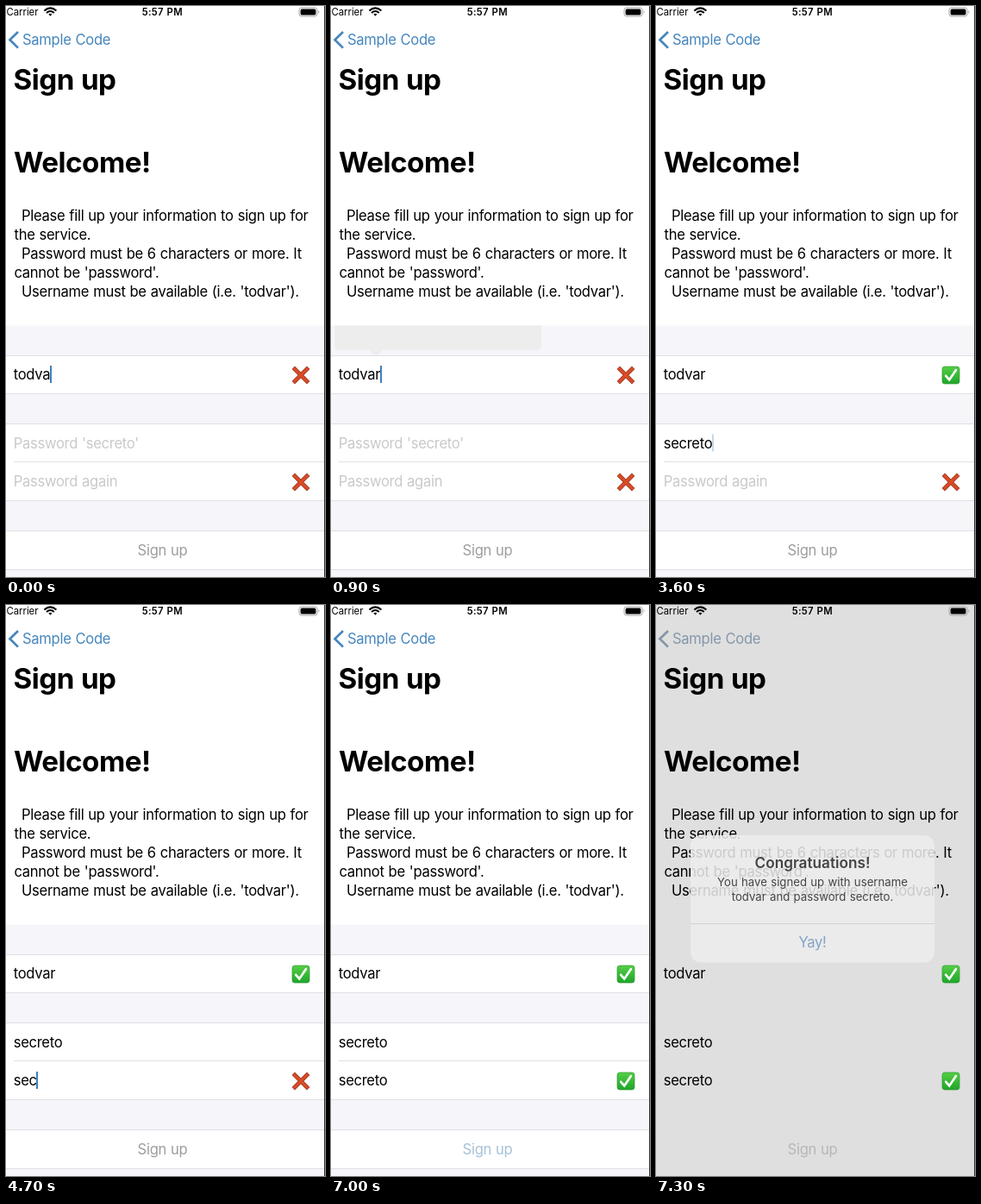
An HTML page for the animation above (7400 ms loop, 370 px wide and 662 px high).

```html
<!DOCTYPE html>
<html lang="en">
<head>
<meta charset="utf-8">
<title>Sign up form</title>
<style>
  html, body { margin: 0; width: 100%; height: 100%; overflow: hidden; background: #fff; }
  svg { display: block; width: 370px; height: 662px; }
  text {
    font: 16.6px Inter, Roboto, sans-serif;
    font-optical-sizing: none;
    letter-spacing: -.3px;
    word-spacing: .6px;
    white-space: pre;
  }
  .big { font-size: 33.2px; font-weight: 700; letter-spacing: -.5px; }
  .status { font-size: 11.3px; letter-spacing: 0; }
  .bold { font-weight: 600; letter-spacing: .3px; }
  .mid { text-anchor: middle; }
  .title { font-size: 17.2px; font-weight: 600; letter-spacing: 0; }
  .note { font-size: 13.2px; letter-spacing: 0; }
</style>
</head>
<body>
<svg viewBox="0 0 370 662">
  <defs>
    <linearGradient id="green" x2="0" y2="1">
      <stop stop-color="#55cf45"/><stop offset="1" stop-color="#1fa52b"/>
    </linearGradient>
    <g id="cross" fill="none">
      <path d="M-8.7 -8.7L8.7 8.7M8.7 -8.7L-8.7 8.7" stroke="#9e3a20" stroke-width="4.8"/>
      <path d="M-8.3 -8.3L8.3 8.3M8.3 -8.3L-8.3 8.3" stroke="#da4a27" stroke-width="3.3"/>
    </g>
    <g id="check">
      <rect x="-10" y="-10" width="20" height="20" rx="3" fill="url(#green)" stroke="#2b9a32" stroke-width=".7"/>
      <path d="M-5.8 .8L-1.8 5.4L5.8 -5.8" fill="none" stroke="#fff" stroke-width="2.7" stroke-linecap="round"/>
    </g>
  </defs>

  <rect id="page" width="370" height="662"/>
  <g id="bands">
    <rect y="370.5" width="370" height="35"/>
    <rect y="449" width="370" height="36"/>
    <rect y="573" width="370" height="36"/>
    <rect y="653" width="370" height="9"/>
  </g>
  <path id="rules" d="M0 405.5H370M0 449.5H370M0 484.5H370M9 528.5H370M0 573.5H370M0 608.5H370M0 653.5H370" stroke="#e0dfe4"/>

  <text class="status" x=".5" y="11">Carrier</text>
  <g fill="none" stroke="#000" stroke-width="2">
    <path d="M44.4 5.4Q51.4 -.6 58.4 5.4M47 7.9Q51.4 4 55.8 7.9"/>
    <path d="M49.4 9.5Q51.4 7.8 53.4 9.5L51.4 11.8Z" fill="#000" stroke="none"/>
  </g>
  <text class="status bold mid" x="181.3" y="11">5:57 PM</text>
  <rect x="340" y="2" width="21" height="10" rx="2.8" fill="none" stroke="#a5a5a5"/>
  <rect x="341.6" y="3.6" width="17.8" height="6.8" rx="1.5"/>
  <path d="M362.5 5Q364.5 7 362.5 9Z" fill="#a5a5a5"/>

  <g id="back">
    <path d="M14 30L4.5 39.3L14 48.6" fill="none" stroke-width="2.7"/>
    <text x="19" y="45" stroke="none">Sample Code</text>
  </g>
  <text class="big" x="8.6" y="97">Sign up</text>
  <text class="big" x="9" y="193">Welcome!</text>
  <g id="intro"></g>

  <path id="bubble" d="M4 370.5H244V393Q244 399 238 399H60L54 404.5Q52 406 50 404.5L44 399H10Q4 399 4 393Z" fill="#ededee"/>
  <text id="user" x="8.7" y="432.7"></text>
  <text id="pass" x="8.7" y="512.5"></text>
  <text id="again" x="8.7" y="557"></text>
  <rect id="caret" width="2" height="20" fill="#3f7fbd"/>
  <use id="userMark" x="342" y="428"/>
  <use id="passMark" x="342" y="552"/>
  <text id="submit" class="mid" x="181.5" y="637">Sign up</text>

  <g id="alert">
    <rect x="40" y="267" width="283" height="147.5" rx="12" fill="#eee" opacity=".85"/>
    <path d="M40 369.5H323" stroke="#d2d2d4"/>
    <g fill="#444">
      <text class="title mid" x="181.5" y="305">Congratuations!</text>
      <text class="note mid" x="181.5" y="326">You have signed up with username</text>
      <text class="note mid" x="181.5" y="342.5">todvar and password secreto.</text>
    </g>
    <text class="mid" x="181.5" y="397" fill="#84a2c8">Yay!</text>
  </g>
  <rect x="369" width="1" height="662" fill="#333"/>
</svg>

<script>
const LOOP = 7400, STEP = 100;
const $ = id => document.getElementById(id);
const set = (id, attrs) => {
  for (const k in attrs) $(id).setAttribute(k, attrs[k]);
};

// Each track is a list of [start ms, value]; a value holds until the next start.
const at = (track, t) => track.reduce((v, [start, next]) => t >= start ? next : v, track[0][1]);
const typing = (word, times) => [[0, ""], ...times.map((ms, i) => [ms, word.slice(0, i + 1)])];

const fields = {
  user: { y: 417, hint: "", track: [[0, "todva"], [300, "todvar"]] },
  pass: { y: 496.5, hint: "Password 'secreto'",
          track: typing("secreto", [2400, 2500, 2700, 2800, 3000, 3100, 3300]) },
  again: { y: 541, hint: "Password again",
           track: typing("secreto", [4500, 4600, 4700, 4800, 5000, 5100, 5200]) }
};
const tracks = {
  focus: [[0, "user"], [1900, "pass"], [4100, "again"]],
  caret: [[0, 1], [1200, .6], [1300, .25], [1400, 0], [1900, .6], [2000, 1],
          [3500, .7], [3600, .3], [3700, 0], [4100, .4], [4200, .8], [4300, 1],
          [5500, .7], [5600, .3], [5700, 0], [5900, .4], [6000, .8], [6100, 1],
          [6400, .7], [6500, .3], [6600, 0]],
  bubble: [[0, 0], [500, 1], [1000, 0]],
  userMark: [[0, "#cross"], [1200, "#check"]],
  passMark: [[0, "#cross"], [5400, "#check"]],
  submit: [[0, "#9d9d9d"], [5900, "#739abd"], [6000, "#4586bd"],
           [7000, "#a5c1d8"], [7100, "#c9c9c9"], [7300, "#b7b7b7"]],
  page: [[0, "#fff"], [7300, "#dfdfdf"]],
  bands: [[0, "#f6f5fa"], [7200, "#f2f1f5"], [7300, "#dfdfdf"]],
  back: [[0, "#4586bd"], [7300, "#8496aa"]],
  rules: [[0, 1], [7300, 0]],
  alert: [[0, 0], [7200, .13], [7300, 1]],
  zoom: [[0, 1.12], [7300, 1]]
};

$("intro").innerHTML = [
  [18, "Please fill up your information to sign up for"],
  [9.5, "the service."],
  [18, "Password must be 6 characters or more. It"],
  [9.5, "cannot be 'password'."],
  [18, "Username must be available (i.e. 'todvar')."]
].map(([x, line], i) => `<text x="${x}" y="${249 + 22 * i}">${line}</text>`).join("");

function draw(t) {
  const now = name => at(tracks[name], t);

  for (const [id, { hint, track }] of Object.entries(fields)) {
    const typed = at(track, t);
    $(id).textContent = typed || hint;
    set(id, { fill: typed ? "#000" : "#c9c9cb" });
  }

  const focus = now("focus"), field = fields[focus];
  const width = at(field.track, t) ? $(focus).getComputedTextLength() : 0;
  set("caret", { x: Math.round(8.4 + width), y: field.y, opacity: now("caret") });

  for (const id of ["userMark", "passMark"]) set(id, { href: now(id) });
  for (const id of ["submit", "page", "bands"]) set(id, { fill: now(id) });
  for (const id of ["bubble", "rules", "alert"]) set(id, { opacity: now(id) });
  set("back", { fill: now("back"), stroke: now("back") });
  set("alert", { transform: `translate(181.5 341) scale(${now("zoom")}) translate(-181.5 -341)` });
}

const begin = performance.now();
function tick() {
  const t = (performance.now() - begin) % LOOP;
  draw(Math.floor(t / STEP) * STEP);
  requestAnimationFrame(tick);
}
tick();
</script>
</body>
</html>
```
